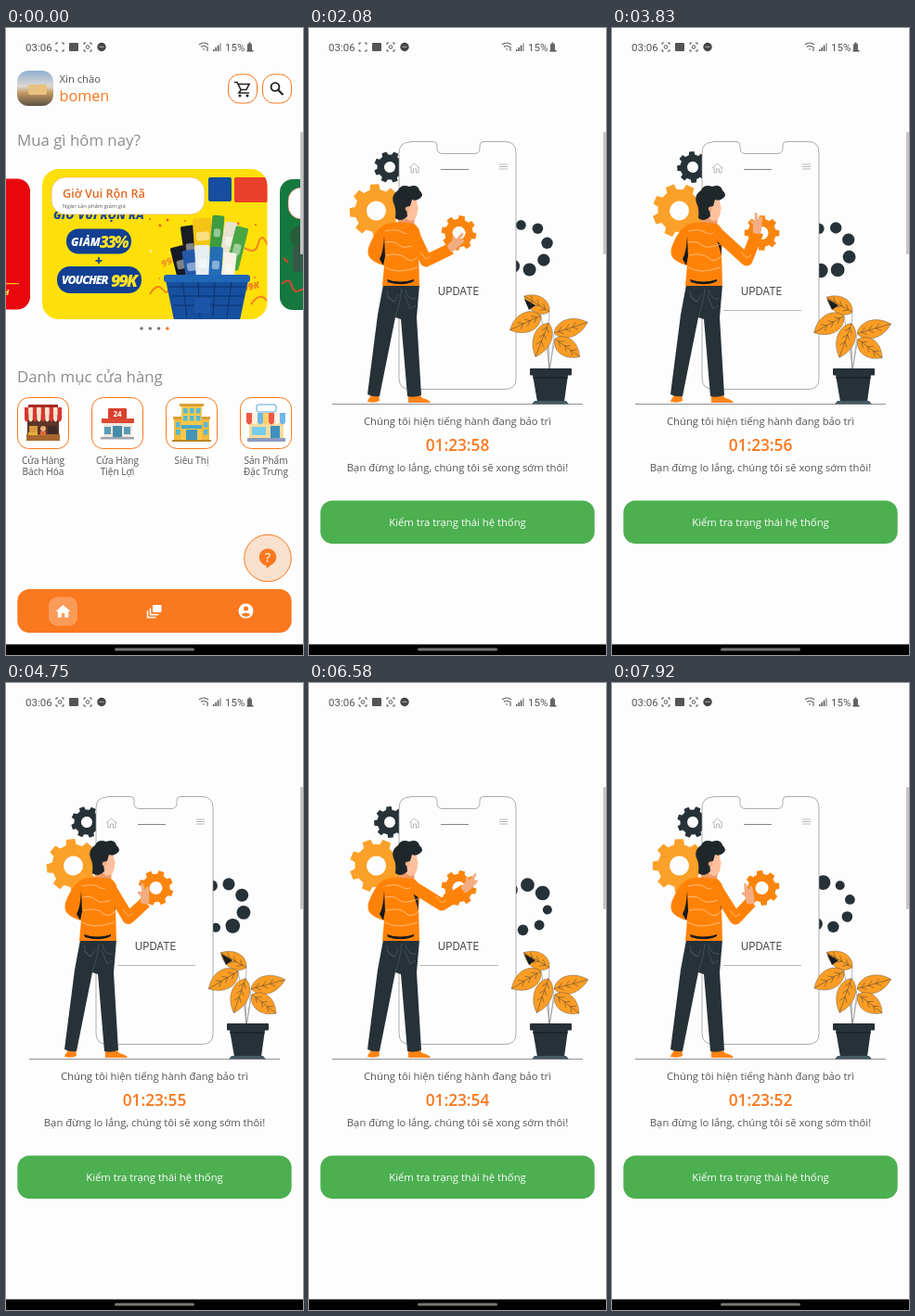
An HTML page that plays this animation: 320 by 676 pixels, repeating every 8 s.

```html
<!DOCTYPE html>
<html lang="vi">
<head>
<meta charset="utf-8">
<title>Bảo trì</title>
<style>
html, body { margin: 0; width: 100%; height: 100%; overflow: hidden; background: #fefdfe; }
svg { display: block; width: 320px; height: 676px; }
text { font-family: "Open Sans", "Noto Sans", sans-serif; }
.m { text-anchor: middle; }
.status text { font-family: Roboto, sans-serif; font-size: 11.5px; fill: #555; }
.line { fill: none; stroke: #8a8a8a; stroke-width: .6; }
.ink { fill: none; stroke: #263238; stroke-width: .4; }
</style>
</head>
<body>
<svg id="stage" viewBox="0 0 320 676"></svg>
<script>
const LOOP = 8000, ORANGE = '#fa781e', DARK = '#263238', PAPER = '#fefdfe';
const stage = document.getElementById('stage');

const rect = (x, y, w, h, fill, r = 0, more = '') =>
  `<rect x="${x}" y="${y}" width="${w}" height="${h}" rx="${r}" fill="${fill}" ${more}/>`;
const circle = (x, y, r, fill, more = '') => `<circle cx="${x}" cy="${y}" r="${r}" fill="${fill}" ${more}/>`;
const path = (d, fill = 'none', more = '') => `<path d="${d}" fill="${fill}" ${more}/>`;
const text = (x, y, size, fill, s, more = '') =>
  `<text x="${x}" y="${y}" font-size="${size}" fill="${fill}" ${more}>${s}</text>`;
const mid = 'class="m"';
const outline = `stroke="${ORANGE}" stroke-width="1"`;
const range = n => [...Array(n).keys()];

function gear(r, hole, fill, id) {
  const points = range(8).flatMap(i =>
    [[-.24, .8], [-.16, 1], [.16, 1], [.24, .8]].map(([da, k]) => {
      const a = i * Math.PI / 4 + da;
      return (r * k * Math.cos(a)).toFixed(2) + ' ' + (r * k * Math.sin(a)).toFixed(2);
    }));
  const ring = `M${hole} 0A${hole} ${hole} 0 1 0 ${-hole} 0A${hole} ${hole} 0 1 0 ${hole} 0Z`;
  return `<g id="${id}">` + path(`M${points.join('L')}Z${ring}`, fill, 'fill-rule="evenodd"') + '</g>';
}

function statusBar() {
  const brackets = x => path(`M${x - 4} 18v-2h2m4 0h2v2m0 5v2h-2m-4 0h-2v-2`, 'none', 'stroke="#555"');
  const eye = (x, more = '') => circle(x, 20.5, 1.8, 'none', `stroke="#555" ${more}`);
  return '<g class="status"><text x="21" y="24.5">03:06</text><text x="236" y="24.5">15%</text>' +
    brackets(58) + eye(58, 'id="eye"') + rect(68, 16, 10, 9, '#555', 1) +
    brackets(88) + eye(88) + circle(103, 20.5, 4.7, '#444') + rect(100.5, 19.7, 5, 1.4, '#999') +
    path('M208 18q5-4 10 0M210 20.5q3-2.5 6 0M212 23h2M217 20v5', 'none', 'stroke="#666" stroke-width="1.2"') +
    range(4).map(i => rect(223 + i * 2.4, 23 - i * 2.2, 1.5, 2 + i * 2.2, i < 3 ? '#555' : '#999')).join('') +
    rect(260, 17, 5, 8, '#666', 1) + rect(261.5, 15.5, 2, 2, '#666') + rect(259.5, 24, 7, 1.5, '#555') + '</g>';
}

function banner() {
  const snacks = [
    [181, 235, 15, 38, '#161a27', -14], [191, 213, 15, 48, '#1a1d23', -8], [192, 239, 17, 35, '#2459a8', -9],
    [202, 205, 20, 37, '#f5c416', -4], [221, 202, 13, 36, '#3d9b40', 5], [233, 209, 14, 40, '#e9e3ce', 9],
    [242, 214, 14, 47, '#4aa545', 14], [204, 234, 16, 38, '#e7eef2', -3], [219, 236, 14, 37, '#236db5', 3],
    [233, 242, 14, 32, '#f6f3e5', 7]
  ].map(([x, y, w, h, fill, a]) =>
    `<g transform="rotate(${a} ${x + w / 2} ${y + h / 2})">${rect(x, y, w, h, fill, 2)}${rect(x + 3, y + h * .4, w - 6, h * .25, '#fff', 2, 'opacity=".45"')}</g>`).join('');
  const bold = 'font-weight="800" font-style="italic"';
  const confetti = range(24).map(i =>
    circle(155 + (i * 47) % 122, 206 + (i * 31) % 92, .9 + i % 2 * .5, ['#ef5026', '#fff2a0', '#f59a1c'][i % 3])).join('');
  return rect(-40, 162.5, 66, 141, '#e8080e', 14) + rect(0, 275, 14, 1.2, '#f8c91c') + text(-3, 288, 9, '#ffe24b', 'H', bold) +
    rect(295, 163, 60, 141, '#14783f', 14) + circle(318, 225, 12, '#275c3b') + rect(309, 235, 11, 28, '#365846', 3) +
    path('M297 276q9-8 11 2t12 3M299 248l5 5', 'none', 'stroke="#d64732" stroke-width="2"') +
    rect(304, 172, 50, 34, '#fff', 14, 'stroke="#d5572f" stroke-width=".6"') +
    '<clipPath id="card"><rect x="39" y="152" width="242.500" height="162" rx="18"/></clipPath><g clip-path="url(#card)">' +
    rect(39, 152, 243, 162, '#fee008') + confetti +
    path('M155 287q8-13 14-5t10-8M257 237q12 8 15-5t10 2M264 298q9-14 17-4', 'none', 'stroke="#f58220" stroke-width="2"') +
    text(169, 258, 10, '#ee9521', '99K', bold + ' transform="rotate(-22 169 258)"') +
    text(256, 284, 10, '#ee7d21', '99K', bold + ' transform="rotate(-12 256 284)"') +
    text(51, 206, 12.5, '#174695', 'GIỜ VUI RỘN RÃ', bold) +
    rect(65, 216.5, 70, 27, '#123f91', 13) + text(70, 235, 12, '#fff', 'GIẢM', bold) + text(101, 237, 17, '#ffe327', '33%', bold + ' letter-spacing="-1.8"') +
    text(100, 256, 14, '#174695', '+', mid + ' font-weight="800"') +
    rect(55, 257, 91, 29, '#123f91', 14) + text(60, 276, 12.3, '#fff', 'VOUCHER', bold + ' letter-spacing="-1"') + text(113, 279, 18, '#ffe327', '99K', bold + ' letter-spacing="-2"') +
    snacks +
    path('M171 267h91l-10 48h-71z', '#174f9f') +
    path('M175 279h83M178 289h78M180 299h74M190 273l5 39M207 273l2 39M225 273l-2 39M243 273l-5 39', 'none', 'stroke="#0c316f"') +
    rect(170, 266, 93, 8, '#2066b7', 3) + rect(203, 291, 17, 16, '#1d55a8', 2) +
    rect(218, 161, 25, 26, '#174e9f', 2) + rect(246, 161, 36, 27, '#e93f2b', 2) +
    rect(49, 161, 165, 40, '#fff', 15, 'stroke="#e9a54a" stroke-width=".6"') +
    text(61, 183, 12.6, '#e2671f', 'Giờ Vui Rộn Rã', 'font-weight="600"') + text(61, 194, 5.9, '#555', 'Ngàn sản phẩm giảm giá') + '</g>' +
    range(4).map(i => circle(146 + i * 9.3, 324, 1.8, i < 3 ? '#777' : ORANGE)).join('');
}

function shops() {
  const awning = (x, y, w, h, colours) => colours.map((fill, i) => {
    const step = w / colours.length;
    return path(`M${x + i * step} ${y}h${step}v${h}q${-step / 2} 5 ${-step} 0z`, fill);
  }).join('');
  const windows = (x, y, cols, rows) => range(cols * rows).map(i =>
    rect(x + i % cols * 7, y + (i / cols | 0) * 8, 4.500, 5.500, '#55b9d5')).join('');
  const stripes = (n, ...colours) => range(n).map(i => colours[i % colours.length]);
  const icons = [
    rect(23, 417, 34, 28, '#5d3528') + rect(25, 429, 9, 9, '#d99a3c') + rect(45, 429, 10, 16, '#3f2a25') +
      rect(22, 438, 36, 7, '#a9672f') + rect(24, 436, 10, 3, '#e5b23d') + circle(40, 432, 3, '#e9b078') + rect(37, 435, 6, 4, '#dd6a38') +
      rect(24, 406, 32, 4, '#a92c26') + awning(20, 409, 40, 13, stripes(9, '#d8372f', '#f6e5cd')),
    rect(105, 421, 31, 21, '#efe7df') + rect(103, 421, 35, 5, '#dc4934') + rect(115, 429, 10, 13, '#488ba8') +
      rect(106, 430, 7, 8, '#589bb5') + rect(127, 430, 7, 8, '#589bb5') + rect(110, 410, 20, 11, '#d9402e', 1) +
      text(120, 418.500, 8, '#fff', '24', mid + ' font-weight="700"') + rect(102, 441, 36, 2.500, '#9ba5ad'),
    rect(181, 420, 38, 25, '#f2b93f') + rect(189, 406, 22, 39, '#f8c94f') + rect(187, 405, 26, 3, '#dda033') + rect(180, 419, 9, 3, '#dda033') +
      rect(211, 419, 9, 3, '#dda033') + windows(191, 410, 3, 2) + windows(183, 425, 1, 2) + windows(213, 425, 1, 2) +
      rect(189, 428, 22, 4, '#4aa8c8') + rect(194, 433, 12, 12, '#3f95ba') + rect(179, 444, 42, 2, '#b9852b'),
    rect(262, 425, 37, 20, '#f8dc9d') + rect(265, 430, 15, 9, '#78cdec') + rect(285, 429, 10, 16, '#3e90bf') +
      rect(270, 406, 21, 8, '#fff', 2, 'stroke="#5a9fd0"') + awning(259, 415, 42, 10, stripes(7, '#ef5548', '#fff1df', '#6fb7e8', '#ffd166')) +
      rect(260, 442, 41, 4, '#8d9cc0')
  ];
  const labels = [['Cửa Hàng', 'Bách Hóa'], ['Cửa Hàng', 'Tiện Lợi'], ['Siêu Thị'], ['Sản Phẩm', 'Đặc Trưng']];
  return labels.map((lines, i) => rect(12.5 + i * 80, 398.5, 55, 55, '#fff', 12, outline) + icons[i] +
    lines.map((s, k) => text(40 + i * 80, 470 + k * 12, 10.1, '#555', s, mid)).join('')).join('');
}

function home() {
  return rect(0, 0, 320, 665, PAPER) +
    '<linearGradient id="photo" x2="0" y2="1"><stop stop-color="#8fb0d0"/><stop offset=".45" stop-color="#dcd9d2"/><stop offset=".62" stop-color="#c49a62"/><stop offset="1" stop-color="#5d5246"/></linearGradient>' +
    rect(12, 46, 39, 38, 'url(#photo)', 12) + rect(24, 61, 20, 11, '#e7c17d', 2) +
    text(57.5, 58.5, 11.3, '#555', 'Xin chào') + text(57.5, 78.5, 16.2, ORANGE, 'bomen', 'font-weight="500"') +
    rect(239.5, 50, 31, 31, '#fff', 12, outline) + rect(276.5, 50, 31, 31, '#fff', 12, outline) +
    path('M246 58.500h3l4 8h6l3-6h-12M253 67l-2 3h11', 'none', 'stroke="#222" stroke-width="1.6"') +
    circle(252, 73, 1.5, '#222') + circle(260, 73, 1.5, '#222') +
    circle(290, 63.5, 4.4, 'none', 'stroke="#222" stroke-width="1.9"') + path('M293.5 67l5 5', 'none', 'stroke="#222" stroke-width="2.2"') +
    text(12, 127, 16.8, '#8c8c8c', 'Mua gì hôm nay?') + banner() +
    text(12, 381.5, 16.8, '#8c8c8c', 'Danh mục cửa hàng') + shops() +
    circle(282, 571.5, 25.3, '#fae1ce', outline) + circle(282, 570.5, 9.3, ORANGE) + path('M280 578h6l-5 5z', ORANGE) +
    text(282, 575.8, 14.5, '#fae1ce', '?', mid + ' font-weight="600"') +
    rect(12.3, 605, 295.4, 47, ORANGE, 13) + rect(46, 613.5, 31, 31, '#fb9b58', 9) +
    path('M61.5 622l-8 7h2.3v6.5h4v-4.500h3.500v4.500h4v-6.500h2.300z', '#fff') +
    path('M152.500 628v7.500h9M155.500 625.500v7h9', 'none', 'stroke="#fff" stroke-width="1.5"') + rect(158, 622, 9.5, 8, '#fff', 1) +
    circle(258.500, 628.500, 8, '#fff') + circle(258.500, 626, 2.5, ORANGE) + path('M253.500 632.500q5-4 10 0q-5 4.500-10 0z', ORANGE);
}

const leaves = [ // base x, y, length, angle, half width, sway
  [259, 307, 32, 209, 11, 3], [250, 311, 37, 147, 13, 8], [258, 319, 39, 108, 12, 3],
  [264, 330, 38, -14, 12, -4], [265, 336, 33, 39, 12, -3]];

function plant() {
  return leaves.map(([x, y, len, , w], i) =>
    path(`M259 369Q${i < 3 ? 257 : 263} 345 ${x} ${y}`, 'none', 'class="line"') + `<g id="leaf${i}">` +
    path(`M0 0C${len * .15} ${-w} ${len * .65} ${-w * 1.15} ${len} 0C${len * .65} ${w * 1.15} ${len * .15} ${w} 0 0Z`, '#fb9d25', `stroke="${DARK}" stroke-width=".3"`) +
    path(`M0 0H${len}` + range(3).map(k => `M${5 + k * 8} 0l5 -4m-5 4l5 4`).join(''), 'none', 'class="ink"') +
    '</g>').join('') + path('M232 292l5 12 7-5z', '#181e22') +
    path('M241 374h38l-4 29h-29z', DARK) + rect(238, 367, 45, 7.5, DARK, 1) + path('M243 402h34l3 3.500h-40z', '#455a64') +
    path('M241 377h38', 'none', 'stroke="#111b20"');
}

function person() {
  return path('M66 394h9l1 8q-5 3-13 1q0-3 3-5zM107 394h11l4 5q8 2 9 5h-24z', '#ff8416') +
    path('M80 277h39l-3 35 5 84q-8 3-15 1l-7-83-6-2-17 85q-7 1-13-2l11-86z', DARK) +
    path('M100 281q-2 18-7 30M84 283q1 11 8 12M104 282q2 11 11 10M84 289l8 6 4-8M103 288l6 15 6-4', 'none', 'stroke="#52636b" stroke-width=".6"') +
    path('M97 202h17l-1 13h-18z', '#ed9a6a') + path('M105 184h11l1 14q-1 10-8 10-6-2-7-9z', '#ffc09d') +
    path('M116 189l2 6-2 1z', '#ffc09d') +
    path('M84 211q10-3 29 0 7 4 7 15l-2 15 1 37H79l2-22q-8-2-13-6-6-4-4-13 8-22 20-26z', '#ff8208') +
    path('M81 224q-1 19-5 25l4 7 2-10z', '#15191b') + path('M112 225l6 20-1-20z', '#15191b') +
    path('M82 219q13-3 18 1t13-1M82 231q10-2 15 3t20-1M83 245q15-3 21 3t14-2M82 258q12 8 35 0', 'none', 'stroke="#ffd5a7" stroke-width=".7"') +
    path('M84 271q14 5 29 0v2q-12 6-28 1z', '#15191b') +
    path('M93 205q1-9-1-14-5-10 4-16 3-7 12-4 9-3 11 4 6 5 0 9-4 3-8 1l-2 7-4 1 1 10q-7 7-13 2z', '#20272b') +
    circle(106, 195, 2.3, '#f5ad83') +
    '<polyline id="arm" fill="none" stroke="#ff8208" stroke-width="13" stroke-linejoin="round"/>' +
    '<polyline id="crease" class="line" style="stroke:#ffd5a7"/>' +
    `<g id="hand">${path('M-2-4.500q8-3 13-1l8-2q3 1 0 3l-6 2 4 2q1 3-8 3-7 2-11 0z', '#f3ad83')}${path('M4-4l5-6 2 1-2 6z', '#f3ad83')}</g>`;
}

function maintenance() {
  return rect(0, 0, 320, 665, PAPER) +
    range(8).map(i => circle(0, 0, 5, DARK, `id="dot${i}"`)).join('') +
    gear(17, 6, DARK, 'gearDark') + gear(29, 10.5, '#fba028', 'gearBig') +
    path('M109 122.500h25q4 0 4 4v3q0 6 6 6h34q6 0 6-6v-3q0-4 4-4h23q12 0 12 12v244q0 11-12 11H109q-12 0-12-12V135q0-12 12-12z', PAPER, 'stroke="#8a8a8a" stroke-width=".7"') +
    path('M108 151l5.500-5 5.500 5M110 150v6h2.500v-4h3v4h2.500v-6M205 147h9M205 149.500h9M205 152h9', 'none', 'class="line"') +
    path('M142 152.500h30', 'none', 'stroke="#777" stroke-width=".9"') +
    text(161, 288.3, 11.4, '#444', 'UPDATE', mid + ' style="font-family:Inter,sans-serif"') +
    path('M120 304.500h84', 'none', 'id="rule" class="line"') +
    gear(19, 7, '#f9850e', 'gearPhone') + path('M25 405.500h270', 'none', 'stroke="#777" stroke-width=".8"') +
    person() + plant() +
    text(160, 427.5, 11.28, '#555', 'Chúng tôi hiện tiếng hành đang bảo trì', mid) +
    text(160, 455.7, 17.3, ORANGE, '', mid + ' id="clock" font-weight="600"') +
    text(160, 478, 11.28, '#555', 'Bạn đừng lo lắng, chúng tôi sẽ xong sớm thôi!', mid) +
    rect(12.3, 509.5, 295.4, 46.5, '#4caf50', 13) + text(160, 536.5, 11.28, '#fff', 'Kiểm tra trạng thái hệ thống', mid);
}

stage.innerHTML = home() + `<g id="maintenance">${maintenance()}</g>` + statusBar() +
  rect(317, 112, 3, 132, '#c5c5c5', 1) + rect(0, 664.5, 320, 11.5, '#000') + rect(117, 668.500, 86, 3, '#777', 1.5);

const el = id => document.getElementById(id);
const set = (id, name, value) => el(id).setAttribute(name, value);
const clamp = v => Math.max(0, Math.min(1, v));

// Rows are [time, ...values]; ease blends neighbouring rows.
function sample(rows, t, ease = k => k) {
  let i = rows.findIndex(row => row[0] > t);
  if (i < 0) i = rows.length - 1;
  i = Math.max(1, i);
  const [a, b] = [rows[i - 1], rows[i]];
  const k = ease(clamp((t - a[0]) / (b[0] - a[0])));
  return a.slice(1).map((v, n) => v + (b[n + 1] - v) * k);
}
const smooth = k => k * k * (3 - 2 * k);

const REACH = 3420;
const armPoses = [ // elbow, wrist, hand angle
  [0, 133, 254, 150, 236, -92], [1000, 126, 251, 153, 238, -35], [1170, 126, 251, 153, 238, -35],
  [2080, 143, 239, 168, 223, -38], [2750, 145, 250, 157, 220, -78], [REACH, 133, 254, 150, 236, -92]];
const loader = [ // angle of the smallest dot, centre height
  [0, 56, 240], [1080, 3, 239], [2080, -56, 236.5], [3830, -115, 238.5],
  [5670, -211, 242], [6580, -264, 242], [7920, -328, 239], [LOOP, -332, 239]];
const sway = [[0, .6], [1080, .2], [2080, 1], [3830, .5], [5670, 0], [6580, .3], [7920, .4], [LOOP, .45]];

function draw(t) {
  set('maintenance', 'opacity', smooth(clamp((t - 660) / 190)));
  set('eye', 'opacity', t < 2900 ? 0 : 1);
  set('rule', 'opacity', clamp((t - 2150) / 200));
  el('clock').textContent = '01:23:' + (59 - Math.max(0, Math.floor((t - 750) / 1000)));

  const spin = (id, x, y, a) => set(id, 'transform', `translate(${x} ${y}) rotate(${a})`);
  spin('gearDark', 87, 150, 12 - t * .016);
  spin('gearBig', 72.5, 197, 8 + t * .016);
  spin('gearPhone', 161.5, 221, 14 + t * .02);

  const [first, cy] = sample(loader, t);
  range(8).forEach(i => {
    const a = (first + i * 45) * Math.PI / 180;
    set('dot' + i, 'cx', 233 + 24 * Math.sin(a));
    set('dot' + i, 'cy', cy - 24.5 * Math.cos(a));
    set('dot' + i, 'r', 5 + i * .4);
  });

  const [ex, ey, wx, wy, angle] = sample(armPoses, (t - 1080 + REACH) % REACH, smooth);
  set('arm', 'points', `111,219 ${ex},${ey} ${wx},${wy}`);
  set('crease', 'points', `${ex - 6},${ey - 9} ${ex},${ey - 2} ${ex + 5},${ey - 5}`);
  spin('hand', wx, wy, angle);

  const [open] = sample(sway, t, smooth);
  leaves.forEach(([x, y, , a, , k], i) => spin('leaf' + i, x, y - open, a + k * open));
}

function frame() {
  draw(performance.now() % LOOP);
  requestAnimationFrame(frame);
}
frame();
</script>
</body>
</html>
```
